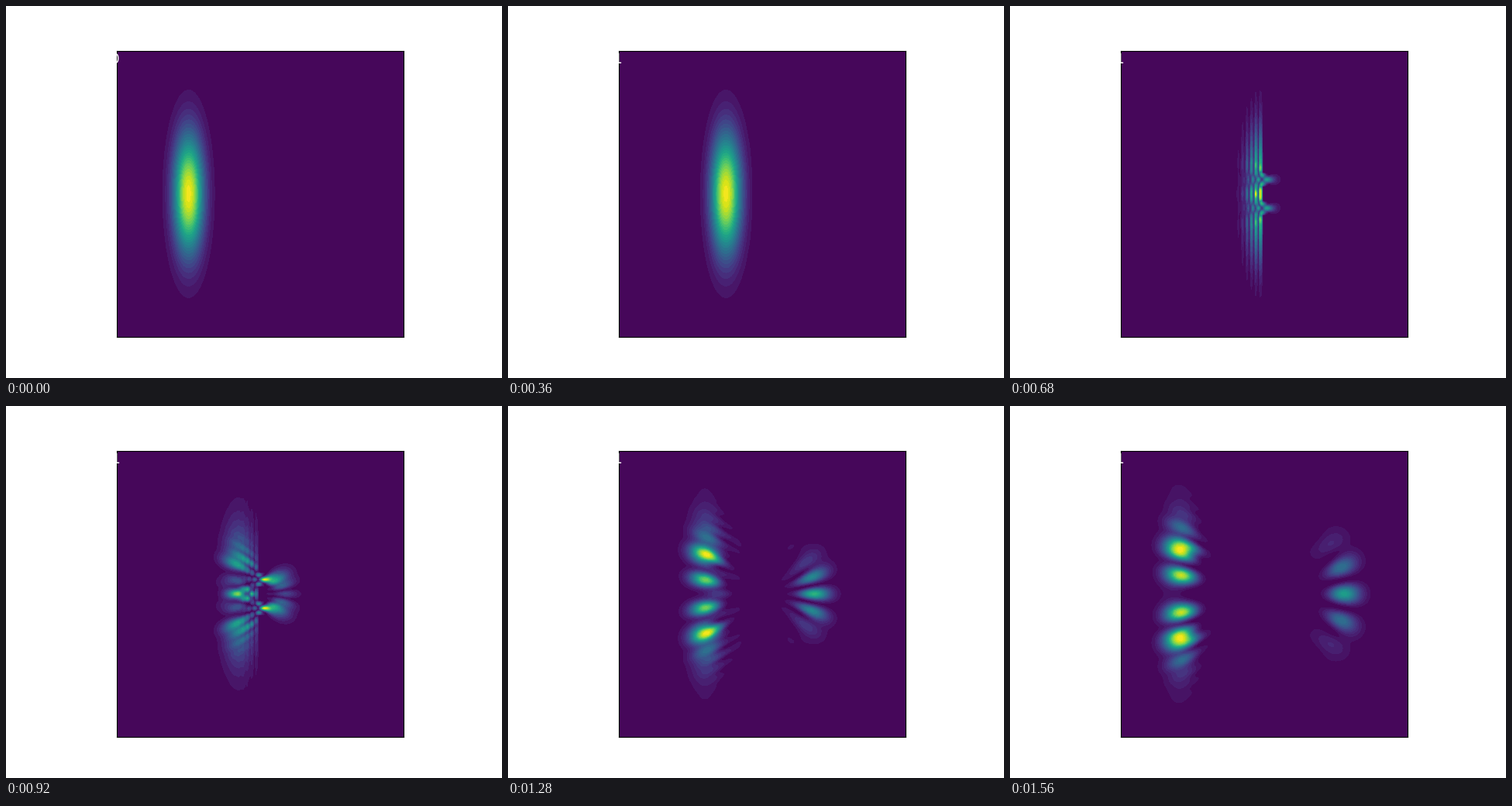
Animation, 640 px wide and 480 px high, one loop 1.6 s. Source, as a matplotlib script:

```python
import numpy as np
import matplotlib.pyplot as plt
from matplotlib.animation import FuncAnimation
from numpy.polynomial.chebyshev import chebinterpolate

# Wave packet meeting a double slit, Schroedinger equation on the unit square
H = 0.005
DT = 2.5e-5
FRAMES = 40
STEPS_PER_FRAME = 2
N = 201

axis = np.linspace(0, 1, N)
X, Y = np.meshgrid(axis, axis)


def open_cells():
    """1 where the wave may live, 0 on the border and in the wall."""
    row = np.abs(np.arange(N) - N // 2)
    in_slit = (row > 5) & (row < 15)
    mask = np.ones((N, N))
    mask[:, row <= 1] = in_slit[:, None]
    mask[0] = mask[-1] = 0
    mask[:, 0] = mask[:, -1] = 0
    return mask


MASK = open_cells()


def start_wave():
    u = np.exp(-(X - 0.25) ** 2 / (2 * 0.05 ** 2)
               - (Y - 0.5) ** 2 / (2 * 0.2 ** 2)
               + 200j * (X - 0.25)) * MASK
    return u / np.sqrt(np.sum(np.abs(u) ** 2))


def cayley(s):
    """Crank-Nicolson factor, with the energy range scaled to [-1, 1]."""
    z = 2 * DT / H ** 2 * (1 + s)
    return (1 - 1j * z) / (1 + 1j * z)


COEFS = (chebinterpolate(lambda s: cayley(s).real, 26)
         + 1j * chebinterpolate(lambda s: cayley(s).imag, 26))
QUARTER = -0.25 * MASK[1:-1, 1:-1]


def hop(u):
    out = np.zeros_like(u)
    out[1:-1, 1:-1] = QUARTER * (u[:-2, 1:-1] + u[2:, 1:-1]
                                 + u[1:-1, :-2] + u[1:-1, 2:])
    return out


def step(u):
    """One time step as a Chebyshev series of the Hamiltonian."""
    prev, cur = u, hop(u)
    total = COEFS[0] * prev + COEFS[1] * cur
    for c in COEFS[2:]:
        prev, cur = cur, 2 * hop(cur) - prev
        total += c * cur
    return total


def simulate():
    u = start_wave()
    densities = []
    for _ in range(FRAMES):
        densities.append(np.abs(u) ** 2)
        for _ in range(STEPS_PER_FRAME):
            u = step(u)
    return densities


densities = simulate()

fig, ax = plt.subplots(figsize=(6.4, 4.8), dpi=100)
ax.set_aspect("equal")
ax.set_xticks([])
ax.set_yticks([])
label = fig.text(136.3 / 640, 1 - 74 / 480, "0", color="white",
                 fontsize=12, family="DejaVu Sans")
drawn = []


def update(i):
    while drawn:
        drawn.pop().remove()
    drawn.append(ax.contourf(X, Y, densities[i], 30, cmap="viridis"))
    ax.set_xlim(0, 1)
    ax.set_ylim(0, 1)
    label.set_text("0" if i == 0 else "1")
    return drawn


anim = FuncAnimation(fig, update, frames=FRAMES, interval=40,
                     repeat=True, repeat_delay=0, blit=False)
plt.show()
```
